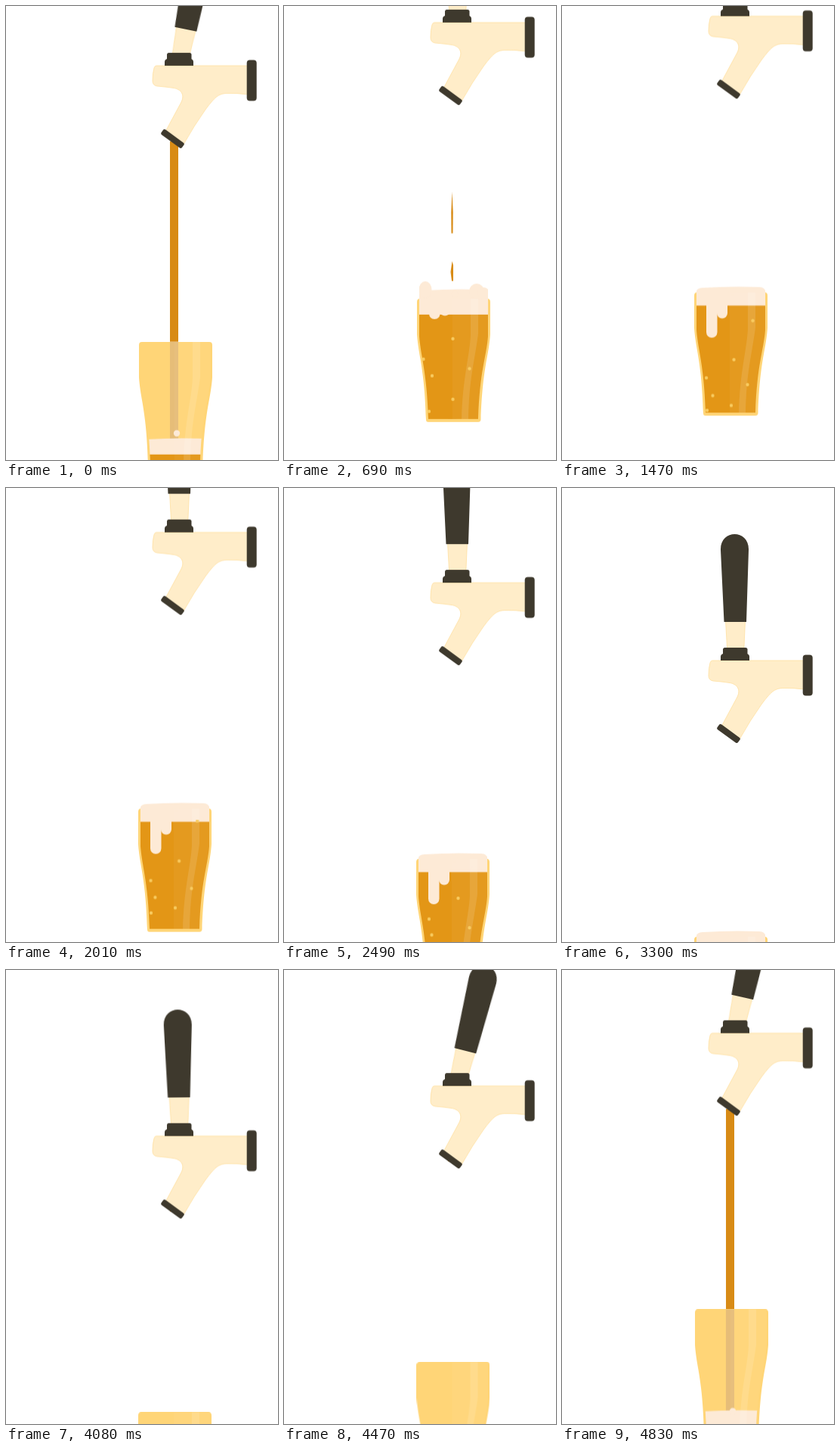
Write an HTML page without scripts that moves like this. It is 360x600 px and loops after 4.86 s.

```html
<!DOCTYPE html>
<html lang="en">
<head>
<meta charset="utf-8">
<title>Beer tap</title>
<style>
  html, body { margin: 0; width: 100%; height: 100%; overflow: hidden; background: #fff; }
  svg { display: block; width: 100%; height: 100%; }
  .anim { animation: 4860ms linear infinite; }
  .camera { animation-name: camera; }
  .handle { animation-name: handle; transform-origin: 230px -8px; }
  .fall { animation-name: fall; }
  .swap { animation-name: swap; }
  .level { animation-name: level; }
  .head { animation-name: head; }
  .blobs { animation-name: blobs; }
  .hop { animation-name: hop; }
  .drip { animation-name: drip; }
  .fizz circle { animation: rise 4860ms linear infinite; }
  .cream { fill: #ffedc9; stroke: #ffe0a0; stroke-width: .8; }

  @keyframes camera {
    0% { transform: translateY(79px); animation-timing-function: cubic-bezier(.333, .551, .667, .78); }
    11.11% { transform: translateY(30px); animation-timing-function: cubic-bezier(.333, .627, .667, 1); }
    25.31% { transform: translateY(8px); animation-timing-function: cubic-bezier(.333, 0, .667, .444); }
    51.235% { transform: translateY(125px); animation-timing-function: cubic-bezier(.333, .512, .667, 1); }
    75.1% { transform: translateY(242px); animation-timing-function: cubic-bezier(.333, 0, .667, .27); }
    88.89% { transform: translateY(183.5px); animation-timing-function: cubic-bezier(.333, .327, .667, .743); }
    100% { transform: translateY(79px); }
  }
  @keyframes handle {
    0% { transform: translateY(2.2px) rotate(11.6deg); animation-timing-function: cubic-bezier(.3, .5, .6, 1); }
    6%, 76% { transform: translateY(0) rotate(0deg); }
    84% { transform: translateY(0) rotate(-.5deg); animation-timing-function: ease-in-out; }
    95% { transform: translateY(4px) rotate(17deg); animation-timing-function: cubic-bezier(.4, 0, .7, .5); }
    100% { transform: translateY(2.2px) rotate(11.6deg); }
  }
  @keyframes fall {
    0%, 5.35% { transform: translateY(0); }
    14.2% { transform: translateY(260px); }
    20%, 74.9% { transform: translateY(430px); }
    74.91%, 92.2% { transform: translateY(-430px); animation-timing-function: ease-in; }
    96.7%, 100% { transform: translateY(0); }
  }
  @keyframes swap {
    0%, 14.2% { transform: translateX(0); }
    30%, 68% { transform: translateX(-1px); animation-timing-function: ease-in; }
    74.9% { transform: translateX(-150px); }
    74.91% { transform: translateX(90px); animation-timing-function: ease-out; }
    77.8%, 84% { transform: translateX(-1px); }
    100% { transform: translateX(0); }
  }
  @keyframes level {
    0% { transform: translateY(514px); animation-timing-function: cubic-bezier(.333, .36, .667, .9); }
    14.2% { transform: translateY(386px); animation-timing-function: ease-out; }
    30.25%, 74.9% { transform: translateY(382.5px); }
    74.91%, 97% { transform: translateY(543px); }
    100% { transform: translateY(514px); }
  }
  @keyframes head {
    0% { transform: translateY(493px); animation-timing-function: cubic-bezier(.333, .33, .667, .9); }
    14.2% { transform: translateY(353px); animation-timing-function: ease-out; }
    30.25%, 74.9% { transform: translateY(358px); }
    74.91%, 96.6% { transform: translateY(526px); }
    100% { transform: translateY(493px); }
  }
  @keyframes blobs {
    0%, 4% { transform: translateY(24px); animation-timing-function: ease-out; }
    14.2% { transform: translateY(0); animation-timing-function: ease-in-out; }
    24%, 100% { transform: translateY(24px); }
  }
  @keyframes hop {
    0%, 5%, 9% { transform: translateY(-7px); }
    1% { transform: translateY(-9px); }
    3%, 7%, 11%, 98% { transform: translateY(6px); }
    99.38% { transform: translateY(1px); }
    100% { transform: translateY(-7px); }
  }
  @keyframes drip {
    0%, 9.5% { transform: translateY(-60px); }
    14.2% { transform: translateY(var(--start)); animation-timing-function: ease-out; }
    30%, 74.9% { transform: translateY(0); }
    74.91%, 100% { transform: translateY(-60px); }
  }
  @keyframes rise {
    0%, 9% { transform: translateY(34px); opacity: 0; }
    11% { opacity: 1; }
    14.2% { transform: translate(0, 0); animation-timing-function: ease-out; }
    30.25% { transform: translate(var(--x1, 0), var(--y1)); }
    51.23% { transform: translate(var(--x2, 0), var(--y2)); }
    74.9% { transform: translate(var(--x2, 0), calc(var(--y2) - 38px)); opacity: 1; }
    74.91%, 100% { transform: translateY(34px); opacity: 0; }
  }
</style>
</head>
<body>
<svg viewBox="0 0 360 600" preserveAspectRatio="none">
  <defs>
    <clipPath id="inside">
      <path d="M179 320H270V415C268 442 259 460 257 524H191C189 460 181 442 179 415Z"/>
    </clipPath>
    <clipPath id="aboveRim"><path d="M200 98H250V365H200Z"/></clipPath>
    <clipPath id="belowRim"><path d="M200 365H250V524H200Z"/></clipPath>
    <clipPath id="belowFoam"><path d="M170 380H280V524H170Z"/></clipPath>
    <g id="jet">
      <path d="M217 100H228V530H217Z"/>
      <path d="M222.500 -37Q224.500 -10 223.500 18H221.500Q220.500 -10 222.500 -37Z"/>
      <path d="M222.500 55L224 60V81H222L220.500 69Z"/>
    </g>
  </defs>

  <g class="anim camera">
    <g clip-path="url(#aboveRim)">
      <g class="anim fall"><use href="#jet" fill="#d88b15"/></g>
    </g>

    <!-- tap -->
    <g class="anim handle">
      <path class="cream" d="M216.500 -53H242.500L240.500 -8H219Z"/>
      <path fill="#3e392d" d="M214.500 -51L210 -146C209 -174 248 -174 247 -146L244 -51Z"/>
    </g>
    <path class="cream" d="M199 0H320V38Q306 36 292 36.500C281 37 276 42 264 58Q249 79 235 104L211 87L231 50C238 38 231 31 222 29.500Q213 28 200 27Q194 26 194 20Q194 10 196 3Q197 0 199 0Z"/>
    <g fill="#3e392d">
      <rect x="213" y="-17" width="32.500" height="12" rx="2.500"/>
      <path d="M213 -9H245Q248 -8 248 -5V0H210V-5Q210 -8 213 -9Z"/>
      <rect x="318.700" y="-7.500" width="13" height="54" rx="4"/>
      <rect x="203.500" y="92.300" width="34" height="8.400" rx="2.500" transform="rotate(36 220.500 96.500)"/>
    </g>

    <!-- glass -->
    <g class="anim swap">
      <path fill="#ffd577" d="M176 369Q176 365 180 365H269Q273 365 273 369V412C271 442 263 455 260.500 525Q260 528 257 528H191Q188 528 188 525C186 455 178 442 176 412Z"/>
      <g clip-path="url(#belowRim)">
        <g class="anim fall"><use href="#jet" fill="#e6bd78"/></g>
      </g>
      <g clip-path="url(#inside)">
        <g class="anim head" fill="#fdead6">
          <path d="M178 200V8Q179 1 187 1Q224 -1.500 262 0Q270 0 271 8V200Z"/>
          <g class="anim blobs">
            <ellipse cx="187" cy="0" rx="8.500" ry="11"/>
            <circle cx="255" cy="2" r="10"/>
            <circle cx="264" cy="5" r="8"/>
          </g>
          <circle class="anim hop" cx="226" cy="0" r="4.200"/>
        </g>
        <rect class="anim level" x="176" width="98" height="200" fill="#e39616"/>
        <g fill="#fff">
          <path opacity=".04" d="M223 365H273V526H223Z"/>
          <path opacity=".12" d="M247 365H257V412C252 450 245 470 244 526H235C236 470 246 440 247 412Z"/>
        </g>
      </g>
      <g clip-path="url(#belowFoam)">
        <g class="fizz" fill="#f8cb60">
          <circle cx="223.500" cy="498" r="2.200" style="--x1:5px;--y1:-44px;--x2:8px;--y2:-81px"/>
          <circle cx="245.500" cy="457.500" r="2.200" style="--x1:8px;--y1:-55px;--x2:9px;--y2:-95px"/>
          <circle cx="196" cy="467" r="2.200" style="--y1:-92px;--y2:-110px"/>
          <circle cx="184.500" cy="445" r="2.200" style="--x1:3px;--y1:-70px;--y2:-90px"/>
          <circle cx="223.500" cy="418" r="2.200" style="--y1:-50px;--y2:-80px"/>
          <circle cx="192" cy="514" r="2.200" style="--y1:-36px;--x2:1px;--y2:-69.500px"/>
          <circle cx="246.500" cy="529" r="2.200" style="--y1:-42px;--y2:-73px"/>
          <circle cx="200.500" cy="532" r="2.200" style="--y1:-30.500px;--x2:-4px;--y2:-66.500px"/>
          <circle cx="225" cy="534" r="2.200" style="--y1:-19.500px;--y2:-54px"/>
          <circle cx="193" cy="535" r="2.200" style="--y1:-14px;--y2:-48px"/>
        </g>
        <g fill="#fdead6">
          <rect class="anim drip" style="--start:-33px" x="192" y="345" width="14.500" height="80" rx="7.250"/>
          <rect class="anim drip" style="--start:-12px" x="206" y="345" width="14" height="54.500" rx="7"/>
        </g>
      </g>
    </g>
  </g>
</svg>
</body>
</html>
```
